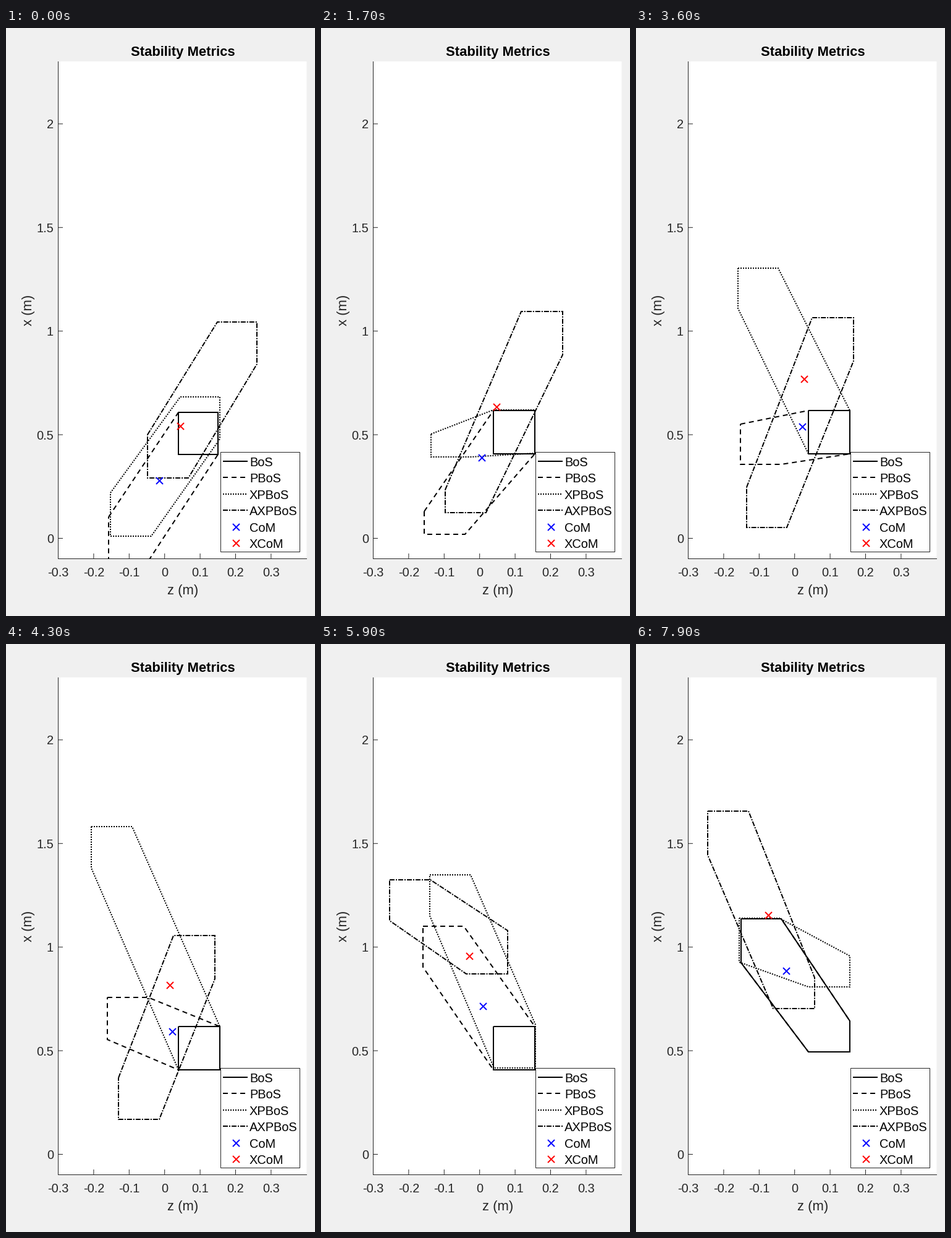
A matplotlib script that plays this animation: 500 by 950 pixels, repeating every 8000 ms.

```python
import numpy as np
import matplotlib.pyplot as plt
from matplotlib.animation import FuncAnimation
from matplotlib.patches import Rectangle

W, H, DPI = 500, 950, 100
PX = 72 / DPI
FRAMES, STEP = 80, 100
HOLD = 400          # pose stays still until this time (ms)
STRIKE = 6300       # left foot joins the base of support
K_BODY, K_FOOT = 3000, 2750   # how far ahead velocity carries a point (ms)
GREY = "#262626"

plt.rcParams["font.family"] = "Liberation Sans"
plt.rcParams["path.snap"] = False

# Key poses in pixels: time, x, y, velocity lead x, velocity lead y
BODY = np.array([
    (400, 248, 731, 34, -88), (3600, 269, 644, 3, -77),
    (5900, 262, 585, -22, -81), (7900, 243, 528, -29, -90)])
SWING = np.array([
    (400, 166, 790, 3, -39), (1700, 167, 781, 11, -125),
    (3600, 169, 640, -4, -252), (5000, 159, 504, -10, -244),
    (5900, 165, 456, 11, -83), (7100, 171, 446, -6, -17),
    (7900, 170, 444, -3, -1)])
SWING_LENGTH = [70, 37, 65, 70, 66, 70, 71]


def hermite(keys, k, t):
    """Cubic path through the key poses, with speed = lead / k."""
    ts, pos, vel = keys[:, 0], keys[:, 1:3], keys[:, 3:] / k
    i = int(np.clip(np.searchsorted(ts, t, side="right") - 1, 0, len(ts) - 2))
    d = ts[i + 1] - ts[i]
    s = (t - ts[i]) / d
    return ((1 + 2 * s) * (1 - s) ** 2 * pos[i]
            + s * (1 - s) ** 2 * d * vel[i]
            + s * s * (3 - 2 * s) * pos[i + 1]
            + s * s * (s - 1) * d * vel[i + 1])


def body(t):
    return hermite(BODY, K_BODY, t)


def left_foot(t):
    return hermite(SWING, K_FOOT, t)


def settle(t):
    return np.exp(-(t - HOLD) / 350)


def heel_rise(t):
    return max(0, (t - 5400) / 2500) ** 3.3


def right_foot(t):
    """Lower left corner: settles, stands, then the heel lifts."""
    x = 279 - 0.4 * settle(t) + 1.5 * np.exp(-((t - 6700) / 400) ** 2)
    return np.array([x, 688 + 3.2 * settle(t) - 29 * heel_rise(t)])


def lead(path, k, t, e=1):
    return k * (path(t + e) - path(t - e)) / (2 * e)


def box(x, y, w, h):
    x0, x1 = round(x), round(x + w) + 1
    y0, y1 = round(y), round(y + h)
    return [(x0, y0), (x1, y0), (x1, y1), (x0, y1)]


def feet(t):
    """For each foot: position, size and velocity lead."""
    left_size = np.array([64.5, np.interp(t, SWING[:, 0], SWING_LENGTH)])
    soft = settle(t)
    length = 70 - 2 * soft - 20 * heel_rise(t)
    corner = right_foot(t) - (0, length + 2 * soft)
    right_size = np.array([66 - 3 * soft, length])
    return [(left_foot(t), left_size, lead(left_foot, K_FOOT, t)),
            (corner, right_size, lead(right_foot, K_FOOT, t))]


def cross(o, a, b):
    return (a[0] - o[0]) * (b[1] - o[1]) - (a[1] - o[1]) * (b[0] - o[0])


def chain(points):
    out = []
    for p in points:
        while len(out) > 1 and cross(out[-2], out[-1], p) <= 0:
            out.pop()
        out.append(p)
    return out[:-1]


def hull(points):
    pts = sorted(set(points))
    loop = chain(pts) + chain(pts[::-1])
    return np.array(loop + loop[:1])


fig = plt.figure(figsize=(W / DPI, H / DPI), dpi=DPI, facecolor="#f0f0f0")
ax = fig.add_axes([0, 0, 1, 1])
ax.set_xlim(0, W)
ax.set_ylim(H, 0)
ax.axis("off")


def label(x, y, text, size=20, color=GREY, **kw):
    ax.text(x, y, text, fontsize=size * PX, color=color,
            va="baseline", zorder=8, **kw)


def stroke(xs, ys):
    ax.plot(xs, ys, color=GREY, lw=PX, zorder=1, solid_capstyle="butt")


def outline(dashes, z):
    line, = ax.plot([], [], color="k", lw=2 * PX, zorder=z,
                    solid_capstyle="butt", dash_capstyle="butt",
                    solid_joinstyle="miter", dash_joinstyle="miter")
    if dashes:
        line.set_dashes([d / 2 for d in dashes])
    return line


def cross_mark(color, z):
    line, = ax.plot([], [], "x", color=color, ms=11 * PX, mew=2 * PX,
                    zorder=z, snap=False)
    return line


# Plot area
area = Rectangle((84, 54), 402.5, 804, fc="white", ec="none", zorder=0)
ax.add_patch(area)
stroke([84.5, 84.5], [54, 858])
stroke([84, 487], [857.5, 857.5])
for i in range(7):
    x = 84.5 + 57.4 * i
    stroke([x, x], [857, 849])
    label(x, 886, f"{(i - 3) / 10:g}", ha="center")
for i in range(5):
    y = 824.5 - 167.4 * i
    stroke([84, 92], [y, y])
    label(77, y + 7.5, f"{i / 2:g}", ha="right")
label(286, 45, "Stability Metrics", 22, "k", ha="center", weight="bold")
label(286, 915, "z (m)", 22, ha="center")
label(42, 456, "x (m)", 22, ha="center", rotation=90, rotation_mode="anchor")

# Legend
STYLES = [("BoS", None), ("PBoS", (8, 6)), ("XPBoS", (2, 2)),
          ("AXPBoS", (8, 2, 2, 2))]
ax.add_patch(Rectangle((347.5, 685.5), 128, 161, fc="white", ec=GREY,
                       lw=PX, zorder=6))
for i, (name, dashes) in enumerate(STYLES):
    y = round(700 + 26.4 * i)
    outline(dashes, 7).set_data([351, 391], [y, y])
    label(394, y + 8, name, color="k")
for i, (name, color) in enumerate([("CoM", "blue"), ("XCoM", "red")]):
    y = 805.5 + 26.5 * i
    cross_mark(color, 7).set_data([371.5], [y])
    label(394, y + 8.5, name, color="k")

# Moving parts
bos, pbos, xpbos, axpbos = lines = [outline(d, 3) for _, d in STYLES]
for line in lines:
    line.set_clip_path(area)
com, xcom = cross_mark("blue", 4), cross_mark("red", 4)


def update(k):
    t = max(k * STEP, HOLD)
    center, ahead = body(t), lead(body, K_BODY, t)
    now, moved, relative = [], [], []
    for pos, size, go in feet(t):
        now.append(box(*pos, *size))
        moved += box(*(pos + go), *size)
        relative += box(*(pos - go + 1.95 * ahead), *size)
    both = hull(now[0] + now[1])
    bos.set_data(*(hull(now[1]) if t < STRIKE else both).T)
    pbos.set_data(*both.T)
    xpbos.set_data(*hull(moved).T)
    axpbos.set_data(*hull(relative).T)
    for mark, (x, y) in ((com, center), (xcom, center + ahead)):
        mark.set_data([x], [y])
    return [*lines, com, xcom]


anim = FuncAnimation(fig, update, frames=FRAMES, interval=STEP,
                     init_func=lambda: update(0), repeat=True, repeat_delay=0)
plt.show()
```
